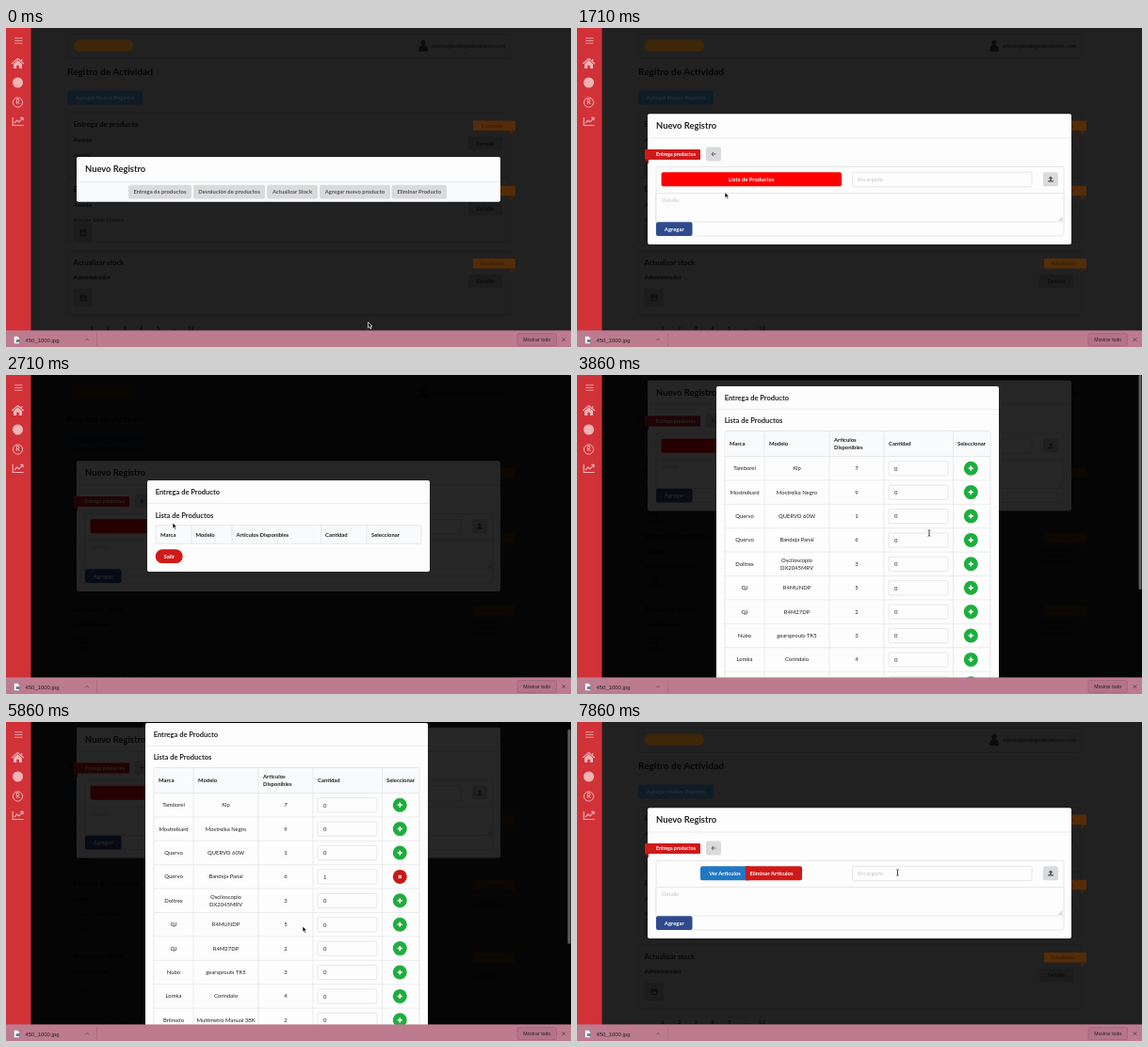
Recreate the animation shown at these times as an HTML page. Size 600 by 339 pixels, loop 8000 ms.

```html
<!DOCTYPE html>
<html lang="es">
<head>
<meta charset="utf-8">
<title>Nuevo Registro</title>
<style>
html, body { margin: 0; width: 100%; height: 100%; overflow: hidden; background: #212121; }
svg { display: block; width: 100vw; height: 100vh; }
text { font-family: Lato, sans-serif; white-space: pre; }
.sys { font-family: "Liberation Sans", Arial, sans-serif; }
</style>
</head>
<body>
<svg id="stage" viewBox="0 0 600 339" xmlns="http://www.w3.org/2000/svg"></svg>
<script>
const INK = '#222', RED = '#d01919', LINE = '#dedfdf', GREY = '#d9dadb', PAPER = '#fdfdfd', ICON = '#efb4b6';

// Shape helpers; text is placed by its vertical centre.
const text = (x, y, s, size = 5.9, o = {}) =>
  `<text x="${x}" y="${(y + size * .35).toFixed(2)}" font-size="${size}" font-weight="${o.w || 700}" ` +
  `text-anchor="${o.a || 'start'}" fill="${o.f || INK}" class="${o.c || ''}">${s}</text>`;
const mid = (x, y, s, size, o) => text(x, y, s, size, { a: 'middle', ...o });
const rect = (x, y, w, h, fill, r = 0, extra = '') =>
  `<rect x="${x}" y="${y}" width="${w}" height="${h}" rx="${r}" fill="${fill}" ${extra}/>`;
const box = (x, y, w, h, fill = PAPER, r = 1.5, extra = '') =>
  rect(x, y, w, h, fill, r, `stroke="${LINE}" stroke-width=".7" ${extra}`);
const path = (d, stroke, w = 1, fill = 'none') =>
  `<path d="${d}" stroke="${stroke}" stroke-width="${w}" fill="${fill}" stroke-linejoin="round"/>`;
const button = (x, y, w, h, fill, label, color = '#fff', r = 2, id = '') =>
  rect(x, y, w, h, fill, r, id && `id="${id}"`) + mid(x + w / 2, y + h / 2, label, 5.9, { f: color });
const group = (id, body) => `<g id="${id}">${body}</g>`;
const panel = (y, h) => rect(65.5, y, 469.5, h, 'none', 2, 'stroke="#1c1c1c" stroke-width=".6"');

function card(y, title, who, note, ribbonText) {
  const dark = { f: '#070707' }, iconY = y + (note ? 36 : 28);
  return panel(y - 12, 68) + text(71.5, y, title, 7.6, dark) + text(71.5, y + 16, who, 6.2, dark) +
    text(71.5, y + 32, note, 6, { w: 400, f: '#0b0b0b' }) +
    rect(71.5, iconY, 20.5, 19, '#1c1c1c', 2) +
    path(`M79 ${iconY + 7}h6v5.5h-6zM79 ${iconY + 8.7}h6`, '#0a0a0a', .9) +
    rect(496, y - 4, 45, 10.5, '#542c08', 1) + path(`M535 ${y + 6.5}h6l-6 5z`, 'none', 0, '#42230a') +
    mid(516, y + 1.3, ribbonText, 5, { f: '#3a1f06' }) +
    button(491, y + 13, 36, 14, '#1c1c1c', 'Detalle', '#0b0b0b');
}

const page = rect(0, 0, 600, 339, '#212121') + panel(6.5, 26) +
  rect(72, 12.5, 63, 12.5, '#3e2608', 6) +
  `<circle cx="443" cy="15.5" r="2.6" fill="#0c0c0c"/>` + path('M438 25q0-7 5-7t5 7z', 'none', 0, '#0c0c0c') +
  text(452, 18.5, 'admin@bodegadetalleres.com', 6, { w: 400, f: '#0a0a0a' }) +
  text(65, 46.7, 'Regitro de Actividad', 10.1, { f: '#060606' }) +
  button(65, 66.5, 80, 15, '#101c25', 'Agregar Nuevo Registro', '#25313a') +
  card(102.5, 'Entrega de producto', 'Asunto', 'Asunto', 'Entregado') +
  card(171.7, 'Entrega de producto', 'Asunto', 'Brenda Salas Orozco', 'Entregado') +
  card(249, 'Actualizar stock', 'Administrador', '', 'Actualizado') +
  [1, 2, 3, 4, 5, '...', 12].map((n, i) => mid(91 + i * 17.6, 319, n, 6, { f: '#090909' })).join('');

const menuModal = rect(75, 137, 450, 47.6, PAPER, 2) + rect(75, 163.5, 450, 21.1, '#f9fafb', 2) +
  text(84, 150, 'Nuevo Registro', 9.4) + path('M75 163.5H525', LINE, .6) +
  [[130, 67, 'Entrega de productos'], [199, 76, 'Devolución de productos'], [277, 54, 'Actualizar Stock'],
   [333, 75, 'Agregar nuevo producto'], [409.5, 58.5, 'Eliminar Producto']]
    .map(([x, w, s], i) => button(x, 166.7, w, 14.8, GREY, s, '#555', 2, i ? '' : 'first')).join('');

const formModal = rect(75, 91.2, 450, 138.8, PAPER, 2) +
  text(84, 104, 'Nuevo Registro', 9.4) + path('M75 117H525', LINE, .6) +
  rect(72, 129, 59, 11, RED, 1) + path('M72 139.5h4v5z', 'none', 0, '#a31414') +
  text(84, 134.5, 'Entrega productos', 5.15, { f: '#fff' }) +
  rect(137, 126.5, 16, 15, GREY, 2) + path('M147.4 134H143.2M145 132L142.9 134L145 136', '#555', .9) +
  box(84, 147.5, 433, 73.5) +
  group('pick', button(89.6, 153.3, 191.4, 15, '#f00', 'Lista de Productos')) +
  group('chosen', rect(131, 153.3, 52, 15, '#2078c4', 2) + rect(179, 153.3, 60, 15, RED, 2) +
    rect(179, 153.3, 4, 15, RED) +
    mid(157, 160.8, 'Ver Articulos', 5.9, { f: '#fff' }) + mid(206.5, 160.8, 'Eliminar Articulos', 5.9, { f: '#fff' })) +
  box(292.5, 153.3, 190.5, 15.4) + text(298, 161, 'Encargado', 5.9, { w: 400, f: '#c4c4c4' }) +
  rect(495, 153.3, 16, 15, GREY, 2) +
  path('M503 157.6l2.4 2.5h-1.6v1.9h-1.6v-1.9h-1.6z', 'none', 0, '#555') + path('M500.2 162.8h5.6', '#555', 1.4) +
  box(84, 175.5, 433, 30.5) + text(90, 183, 'Detalle', 5.9, { w: 400, f: '#c4c4c4' }) +
  path('M511.5 205l4-4M513.7 205l1.8-1.8', '#888', .6) +
  button(84, 206.3, 38.5, 14.7, '#2f4a8c', 'Agregar');

const emptyModal = rect(150, 112, 300, 97, PAPER, 2) +
  text(158.7, 124, 'Entrega de Producto', 7.5) + path('M150 136.3H450', LINE, .6) +
  text(158.7, 149, 'Lista de Productos', 7.5) + box(159, 159.7, 282, 19.6, '#f9fafb') +
  path('M197 160v19M240 160v19M334.5 160v19M383 160v19', LINE, .6) +
  [[164, 'Marca'], [201.5, 'Modelo'], [244.5, 'Articulos Disponibles'], [339, 'Cantidad'], [388, 'Seleccionar']]
    .map(([x, s]) => text(x, 169.7, s)).join('') +
  button(158.7, 185.3, 29, 14.8, RED, 'Salir', '#fff', 7.4);

const items = [
  'Tamborel;Kip;7', 'Mostrelkard;Mostrelka Negro;9', 'Quervo;QUERVO 60W;1', 'Quervo;Bandeja Panal;6',
  'Doltrex;Osciloscopio|DX2045MRV;3', 'QJ;R4MUNDP;5', 'QJ;R4M27DP;2', 'Nubo;gearsprouts TK5;3',
  'Lomka;Corindalo;4', 'Brilnodo;Multimetro Manual 38K;2', 'Brilnodo;Maker Box - N4.1;23',
  'Horvant;Cepillo electrico|HVQK3816;1', 'Plen Darix;Proyector;2'
].map(s => s.split(';'));
const PICKED = 3, ROW = 25.4;

function itemRow([brand, model, stock], i) {
  const y = 99.2 + i * ROW, thin = { w: 400 }, lines = model.split('|'), hot = i === PICKED;
  return path(`M157 ${y - ROW / 2}H439`, LINE, .6) + mid(178, y, brand, 5.9, thin) +
    lines.map((s, n) => mid(233.5, y + (n - (lines.length - 1) / 2) * 7.8, s, 5.9, thin)).join('') +
    mid(297, y, stock, 5.9, thin) + box(331, y - 7.5, 63, 15.2, PAPER, 1.5, hot ? 'id="field"' : '') +
    `<g ${hot ? 'id="amount"' : ''}>${text(337, y + .4, '0', 5.9, thin)}</g>` +
    `<circle ${hot ? 'id="toggle"' : ''} cx="418.3" cy="${y}" r="7.5" fill="#1fad3f"/>` +
    `<g ${hot ? 'id="sign"' : ''} transform="translate(418.3 ${y})"><path d="M-2.6 0H2.6M0-2.6V2.6" stroke="#fff" stroke-width="1.5"/></g>`;
}

const listModal = rect(148, 12, 300, 434, PAPER, 2) +
  text(156.7, 24, 'Entrega de Producto', 7.5) + path('M148 36.3H448', LINE, .6) +
  text(156.7, 48.7, 'Lista de Productos', 7.5) +
  box(157, 59.5, 282, 357.2) + rect(157.4, 60, 281.2, 26.4, '#f9fafb') +
  [[162, 73, 'Marca'], [204, 73, 'Modelo'], [273, 69, 'Articulos'], [273, 77, 'Disponibles'],
   [331, 73, 'Cantidad'], [404, 73, 'Seleccionar']].map(([x, y, s]) => text(x, y, s)).join('') +
  items.map(itemRow).join('') +
  path('M199 59.5V416.7M268 59.5V416.7M326 59.5V416.7M399.5 59.5V416.7', LINE, .6) +
  rect(156.7, 422.6, 52.3, 14.8, '#2b4a6c', 7.4) + text(165.5, 430, 'Continuar', 5.9, { f: '#fff' }) +
  path('M197.6 427.6l2.4 2.4l-2.4 2.4', '#fff', 1.1) +
  button(210.3, 422.6, 29.5, 14.8, RED, 'Salir', '#fff', 7.4);

const sidebar = rect(0, 0, 26.5, 322, '#d03238') +
  path('M9 10.8h8.6M9 13.5h8.6M9 16.2h8.6', ICON, .8) +
  path('M6.2 38l6.3-5.5l6.3 5.5M16.7 33v2', ICON, 1.1) +
  path('M8 38.3l4.5-4l4.5 4V43h-3.2v-3.2h-2.6V43H8z', 'none', 0, ICON) +
  `<circle cx="12.5" cy="58" r="5.5" fill="${ICON}"/>` +
  `<circle cx="12.5" cy="79" r="5.1" fill="none" stroke="${ICON}" stroke-width="1"/>` +
  mid(12.6, 79, 'R', 7, { f: ICON }) +
  path('M7.2 95v8.5h11.3M9 101l2.8-3l2 1.8l4-4.2M15 95.3h3v3', ICON, 1.1);

const downloads = rect(0, 321.4, 600, 18, '#bd7b90') + path('M96.5 324V338', '#a0667a', .6) +
  path('M8.5 327.5h3.6l2 2v6h-5.6z', '#777', .4, '#fff') + rect(10.6, 331, 4, 3, '#6f7f96') +
  text(20.5, 332, '450_1000.jpg', 5.95, { w: 400, c: 'sys' }) + path('M84.3 332.2l1.8-1.8l1.8 1.8', '#444', .7) +
  rect(543, 324.6, 41.5, 13, '#b47389', 1.5, 'stroke="#9a6075" stroke-width=".6"') +
  mid(563.7, 331, 'Mostrar todo', 5.2, { w: 400, c: 'sys' }) + path('M590.6 329.3l3.6 3.6m0-3.6l-3.6 3.6', '#333', .7);

const pointers =
  group('arrow', path('M0 0V6.2L1.5 4.9L2.5 7.2L3.6 6.7L2.6 4.5H4.5Z', '#fff', .7, '#000')) +
  group('hand', path('M-.7-2.6q.7-.8 1.4 0V0l2.8.6q.8.3.6 1.4L3.4 5H-.4L-2.6 1.8q.2-1 1.9.2z', '#333', .6, '#fff')) +
  group('beam', path('M-1.3-3.2Q0-3.2 0-2.5Q0-3.2 1.3-3.2M0-2.5V2.5M-1.3 3.2Q0 3.2 0 2.5Q0 3.2 1.3 3.2', '#222', .8));

stage.innerHTML = page + group('menu', menuModal) + group('form', formModal) +
  rect(0, 0, 600, 339, '#000', 0, 'id="dim"') + group('empty', emptyModal) + group('list', listModal) +
  rect(596.5, 0, 3, 228, '#5c5c5c', 1.5, 'id="thumb"') + sidebar + downloads + group('pointer', pointers);

// Motion tables: [step, values...], seven steps per second.
const LOOP = 8000, RATE = 7;
const track = [
  [0, 384.5, 312.5], [1, 250, 235], [2, 214, 201], [4, 207, 194], [9, 160, 176], [11, 157, 174.5], [13, 157, 174.5],
  [14, 177, 157], [24, 177, 157], [26, 330, 166], [27, 374, 168], [30, 374, 173], [32, 417, 177], [35, 419, 176],
  [40, 315, 217], [46, 315, 217], [48, 215, 285], [50, 181, 296], [51, 181, 296], [55, 340.5, 160]];
const scroll = [[40, 0], [41, 11], [42, 40], [44, 105], [45, 123], [46, 131]];
const fade = [[15, 0], [16, .3], [17, .75], [18, .94], [19, 1], [51, 1], [52, .7], [53, .3], [54, 0]];
const shapes = [[0, 'arrow'], [5, 'hand'], [11, 'arrow'], [14, 'hand'], [16, 'arrow'], [26, 'beam'], [32, 'hand'],
  [36, 'arrow'], [49, 'hand'], [52, 'arrow'], [55, 'beam']];

function at(table, k) {
  const n = table.findIndex(r => r[0] > k);
  if (n < 0) return table[table.length - 1].slice(1);
  if (!n) return table[0].slice(1);
  const a = table[n - 1], b = table[n], p = (k - a[0]) / (b[0] - a[0]);
  return a.slice(1).map((v, i) => v + (b[i + 1] - v) * p);
}
const $ = id => document.getElementById(id);
const show = (id, on) => { $(id).style.display = on ? '' : 'none'; };
const set = (id, name, v) => $(id).setAttribute(name, v);

function render(k) {
  const [x, y] = at(track, k), [top] = at(scroll, k), [o] = at(fade, k);
  const long = k >= 21 && k < 54, done = k >= 52, lifted = k >= 21 && k < 53;
  const size = .8 + .2 * o;
  show('menu', k < 11);
  show('form', k >= 11);
  show('pick', !done);
  show('chosen', done);
  show('empty', o > 0 && !long);
  show('list', long);
  show('thumb', long);
  set('first', 'fill', k >= 5 && k < 11 ? '#c6c7c9' : GREY);
  set('form', 'transform', `translate(0 ${lifted ? -85.5 : 0})`);
  set('dim', 'opacity', .85 * o);
  set('empty', 'opacity', o);
  set('list', 'opacity', o);
  set('empty', 'transform', `translate(300 160.5) scale(${size}) translate(-300 -160.5)`);
  set('list', 'transform', `translate(298 170) scale(${size}) translate(-298 ${-170 - top})`);
  set('thumb', 'y', top * 93 / 131);
  $('amount').firstChild.textContent = k >= 30 ? '1' : '0';
  set('field', 'stroke', k >= 28 && k < 34 ? '#85b7d9' : LINE);
  set('toggle', 'fill', k >= 34 ? '#c81818' : '#1fad3f');
  set('sign', 'transform', `translate(418.3 ${99.2 + PICKED * ROW}) rotate(${k >= 34 ? 45 : 0}) scale(${k >= 34 ? .85 : 1})`);
  const shape = shapes.filter(s => s[0] <= k).pop()[1];
  ['arrow', 'hand', 'beam'].forEach(s => show(s, s === shape));
  set('pointer', 'transform', `translate(${x} ${y})`);
}

const start = performance.now();
let last = -1;
function tick() {
  const t = (performance.now() - start) % LOOP;
  const k = Math.min(55, Math.floor((t + 5) * RATE / 1000));
  if (k !== last) render(last = k);
  requestAnimationFrame(tick);
}
tick();
</script>
</body>
</html>
```
